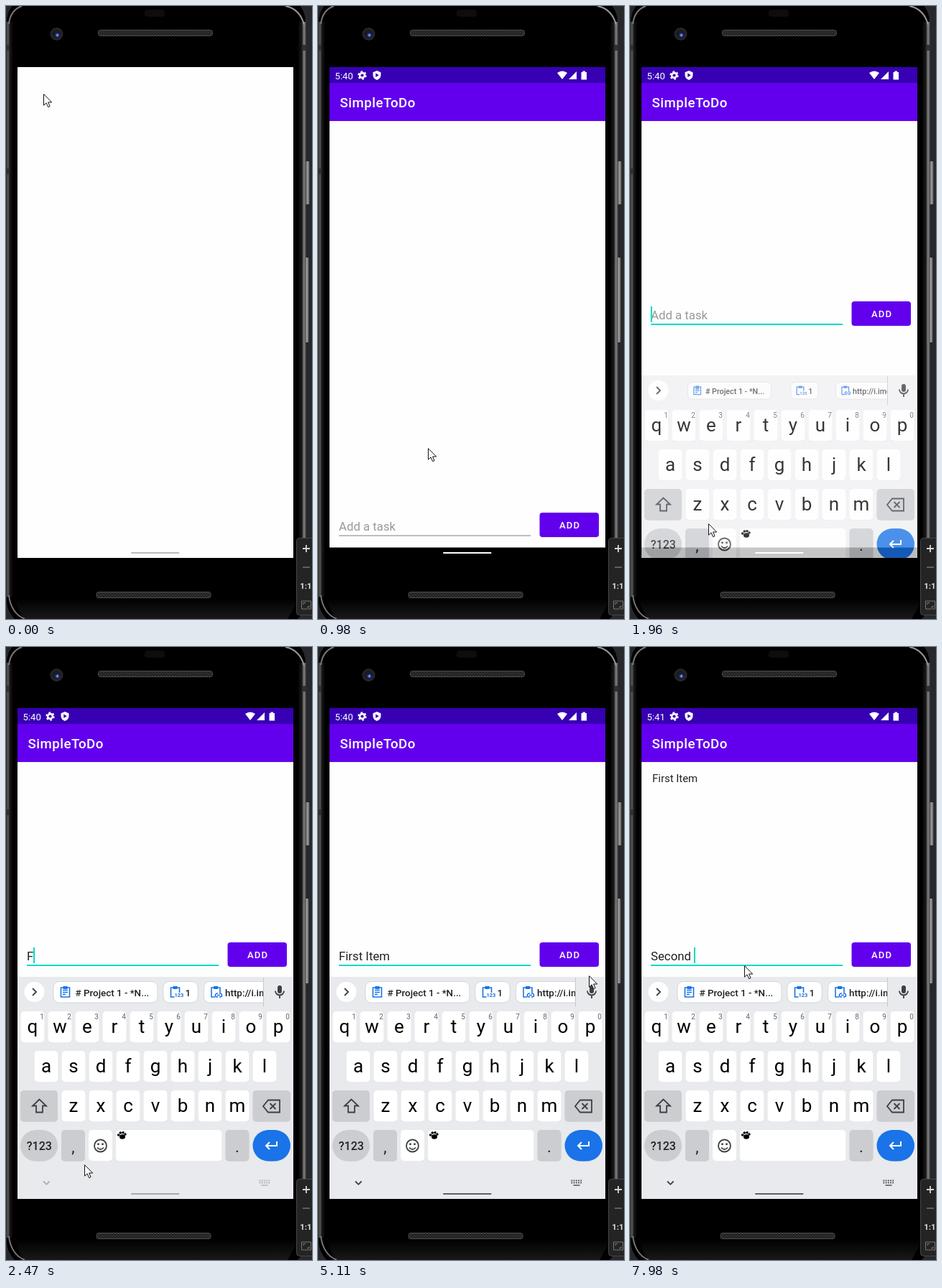
These frames come from a looping animation (426 px wide and 853 px high, 8000 ms). An HTML page:

```html
<!DOCTYPE html>
<html lang="en">
<head>
<meta charset="utf-8">
<title>To-do app</title>
<style>
html, body { margin: 0; width: 100%; height: 100%; overflow: hidden; background: #26282c; }
svg { display: block; width: 100vw; height: 100vh; font-family: Roboto, sans-serif; }
.mid { text-anchor: middle; }
.bold { font-weight: 500; }
.line { fill: none; stroke: #3c4043; stroke-width: 1.8; }
.blue { stroke: #1a73e8; stroke-width: 1.6; }
</style>
</head>
<body>
<svg viewBox="0 0 426 853">
  <defs>
    <linearGradient id="leftEdge"><stop stop-color="#2a2a2a"/><stop offset=".3" stop-color="#5c5c5c"/><stop offset=".5" stop-color="#1c1c1c"/><stop offset="1" stop-color="#000"/></linearGradient>
    <linearGradient id="rightEdge"><stop stop-color="#000"/><stop offset=".5" stop-color="#1a1a1a"/><stop offset=".72" stop-color="#7c7c7c"/><stop offset=".88" stop-color="#666"/><stop offset="1" stop-color="#1c1c1c"/></linearGradient>
    <linearGradient id="side"><stop stop-color="#444"/><stop offset=".5" stop-color="#a2a2a2"/><stop offset="1" stop-color="#555"/></linearGradient>
    <linearGradient id="chin" x2="0" y2="1"><stop stop-color="#000"/><stop offset="1" stop-color="#191919"/></linearGradient>
    <radialGradient id="lens" cx=".58" cy=".62"><stop stop-color="#c3d0ff"/><stop offset=".22" stop-color="#4a5fc0"/><stop offset=".5" stop-color="#171c3c"/><stop offset="1" stop-color="#1c191f"/></radialGradient>
    <pattern id="mesh" width="4" height="4" patternUnits="userSpaceOnUse"><rect width="4" height="4" fill="#1e1e1e"/><path d="M0 0l4 4M4 0L0 4" stroke="#3c3c3c" stroke-width=".7"/></pattern>
    <clipPath id="screen"><path d="M16 85h384v683H16z"/></clipPath>
    <clipPath id="strip"><path d="M60 459h298v42H60z"/></clipPath>
  </defs>

  <!-- phone -->
  <rect width="426" height="853" fill="#26282c"/>
  <rect x="1" y="-14" width="416" height="877" rx="36"/>
  <path d="M0 22h10v800H0z" fill="url(#leftEdge)"/>
  <path d="M406 22h12v800h-12z" fill="url(#rightEdge)"/>
  <path d="M10 824h398l-16 29H24z" fill="url(#chin)"/>
  <g fill="none" stroke="#777" stroke-width="2">
    <path d="M389 0q20 4 26 26" stroke="#999"/><path d="M22 0Q6 6 4 25"/><path d="M4 820q3 25 22 33"/>
  </g>
  <path d="M0 54h4v8H0zM0 226h4v8H0zM413 54h5v8h-5z" fill="#303030"/>
  <rect x="417" y="216" width="5.500" height="60" rx="1.500" fill="url(#side)"/>
  <rect x="416" y="350" width="5.500" height="118" rx="1.500" fill="url(#side)"/>
  <rect x="193" y="5" width="28" height="10" rx="4" fill="#0d0d0d"/>
  <circle cx="70.500" cy="39" r="9" fill="#2a2425"/><circle cx="70.500" cy="39" r="6.500" fill="url(#lens)"/>
  <g fill="url(#mesh)" stroke="#4d4d4d"><rect x="128.500" y="33.500" width="159" height="8" rx="3"/><rect x="126" y="815.500" width="159" height="8" rx="3"/></g>

  <g clip-path="url(#screen)">
    <rect x="16" y="85" width="384" height="683" fill="#fefefe"/>
    <rect id="nav" x="16" y="753.500" width="384" height="15"/>
    <g id="app">
      <rect x="16" y="85" width="384" height="22.500" fill="#3700b3"/>
      <rect x="16" y="160" width="384" height="1" fill="#eee"/>
      <rect x="16" y="107" width="384" height="53" fill="#6200ee"/>
      <text x="30.500" y="141" font-size="18.700" letter-spacing=".470" class="bold" fill="#fff">SimpleToDo</text>
      <text id="item" x="31" y="188" font-size="14.940" fill="#212121">First Item</text>
      <g id="field">
        <text id="entry" x="29" y="435.500" font-size="16.800"></text>
        <rect id="underline" x="29" width="267"/>
        <rect id="caret" y="418" width="2" height="22" fill="#03dac5"/>
        <rect x="309" y="412" width="82" height="33.500" rx="4" opacity=".12"/>
        <rect x="308.500" y="411" width="82.500" height="34" rx="4" fill="#6200ee"/>
        <rect id="ripple" x="308.500" y="411" width="82.500" height="34" rx="4" fill="#fff"/>
        <text x="350.600" y="433" font-size="13.100" letter-spacing="1.170" class="bold mid" fill="#fff">ADD</text>
      </g>
    </g>
    <g id="keyboard">
      <rect id="board" x="16" y="459" width="384" height="490"/>
      <circle cx="39.500" cy="480" r="14" fill="#fff"/>
      <path class="line" d="M37 475l5 5-5 5"/>
      <g id="chips" clip-path="url(#strip)"></g>
      <path d="M358.500 460v40" stroke="#c4c7cb"/>
      <rect x="378" y="471" width="6" height="11" rx="3" fill="#3c4043"/>
      <path class="line" d="M375 478.500a6 6 0 0 0 12 0M381 485v4"/>
      <g id="keys"></g>
      <path class="line" d="M46.500 629.500l-9.500 9h5v9h9v-9h5z"/>
      <path class="line" d="M365 630.500h16v17h-16l-7-8.500zM367.500 635l8 8m0-8l-8 8"/>
      <g fill="#202124"><text x="46.300" y="700" font-size="16" class="mid bold">?123</text><text x="93.500" y="703" font-size="22" class="mid">,</text><text x="322" y="703" font-size="22" class="mid">.</text></g>
      <circle class="line" cx="131.500" cy="694" r="8.500"/>
      <path class="line" d="M127 696.500q4.500 5 9 0"/>
      <path d="M127.200 690.500h2.600v2.600h-2.600zm6 0h2.600v2.600h-2.600z" fill="#3c4043"/>
      <g><ellipse cx="162" cy="681.500" rx="4" ry="3.300"/><circle cx="156.700" cy="679" r="1.800"/><circle cx="159.300" cy="676" r="1.800"/><circle cx="163" cy="675.700" r="1.800"/><circle cx="166" cy="678" r="1.700"/></g>
      <path d="M377 688v6h-15m5-5l-5 5 5 5" fill="none" stroke="#fff" stroke-width="2"/>
      <g id="hints">
        <path class="line" d="M52 743.500l4.300 4.300 4.300-4.300"/>
        <path d="M352.500 742.500h15M352.500 745.500h15" stroke="#555" stroke-width="1.800" stroke-dasharray="1.800 1.400"/><path d="M355.500 749h9" stroke="#555" stroke-width="1.500"/>
      </g>
    </g>
    <g id="status">
      <text id="clock" x="23.600" y="101.500" font-size="13.100"></text>
      <circle cx="61.500" cy="96.500" r="3.400" fill="none" stroke="currentColor" stroke-width="2.600"/>
      <circle cx="61.500" cy="96.500" r="5.200" fill="none" stroke="currentColor" stroke-width="2" stroke-dasharray="2.720"/>
      <path fill-rule="evenodd" d="M82 90l5.500 2.200v4q0 4.500-5.500 6.800-5.500-2.300-5.500-6.800v-4zM80.300 93.500v5.500l4.500-2.800z"/>
      <path d="M333 93q7-5 14 0l-7 9zM349 102h11V91zM366.500 92h2v-1.500h3.500V92h2v10.500h-7.500z"/>
    </g>
    <rect id="pill" x="174" y="760" width="67.500" height="2" rx="1"/>
  </g>

  <!-- emulator zoom panel -->
  <rect x="404.500" y="740.500" width="26" height="107" rx="4" fill="#242424" stroke="#454545"/>
  <path d="M413 755h10M418 750v10" stroke="#d5d5d5" stroke-width="1.800"/>
  <path d="M413 781h10" stroke="#777" stroke-width="1.400"/>
  <text x="417.500" y="811" font-size="11.500" font-weight="700" class="mid" fill="#ddd">1:1</text>
  <path d="M411.500 828h13v11h-13zM414 833v-2.500h3M422 834v2.500h-3" fill="none" stroke="#777"/>

  <path id="mouse" d="M.5.700V16.200l3.600-3.300 2.600 5.800 2.400-1.100-2.500-5.600h5.100z" fill="#fff" stroke="#111"/>
</svg>

<script>
const $ = id => document.getElementById(id);
const set = (id, attrs) => { for (const name in attrs) $(id).setAttribute(name, attrs[name]); };

// Keyboard construction
const key = (x, y, w, fill = '#fff', r = 5) =>
  `<rect x="${x}" y="${y + .6}" width="${w}" height="43.500" rx="${r}" fill="#d9dbde"/>` +
  `<rect x="${x}" y="${y}" width="${w}" height="43.500" rx="${r}" fill="${fill}"/>`;
const GREY = '#cccdd1';
let keys = key(20, 617, 52, GREY) + key(343.5, 617, 52.5, GREY) + key(20, 672, 52, GREY, 22) +
  key(77, 672, 33, GREY) + key(115, 672, 33) + key(153, 672, 147.5) + key(305.5, 672, 33, GREY) +
  key(343.5, 672, 52.5, '#1a73e8', 22);
['qwertyuiop', 'asdfghjkl', 'zxcvbnm'].forEach((row, r) => [...row].forEach((letter, i) => {
  const x = [37, 56, 94][r] + 38 * i, y = [507, 562, 617][r];
  keys += key(x - 16.5, y, 33) + `<text class="mid letter" x="${x}" y="${y + 30}" font-size="26">${letter}</text>`;
  if (!r) keys += `<text class="mid" x="${x + 13}" y="${y + 11}" font-size="10" fill="#5f6368">${(i + 1) % 10}</text>`;
}));
$('keys').innerHTML = keys;
const letters = [...document.querySelectorAll('.letter')];

const marks = [
  '<path class="line blue" d="M-3.500-2.500h7M-3.500.500h7M-3.500 3.500h4"/>',
  '<path d="M-1 1h10v8H-1z" fill="#fff"/><text x="-1" y="7" font-size="7.500" font-weight="700" fill="#1a73e8">123</text>',
  '<path d="M-1 1h10v8H-1z" fill="#fff"/><path class="line blue" d="M3 2H2a2.500 2.500 0 0 0 0 5h1m2-5h1a2.500 2.500 0 0 1 0 5H5M2 4.500h4"/>'
];
const chips = [[66, 145, 96.5, '# Project 1 - *N...'], [219, 48, 249.5, '1'], [275.5, 110, 305, 'http://i.imgur']];
$('chips').innerHTML = chips.map(([x, w, textX, label], i) => `<g class="chip">
  <rect x="${x}" y="465.500" width="${w}" height="29.500" rx="8" fill="#fff" stroke="#d4d7db"/>
  <g transform="translate(${x + 16.5} 480)"><path class="line blue" d="M-6-6H6V7H-6z"/><path d="M-3-8h6v4h-6z" fill="#1a73e8"/>${marks[i]}</g>
  <text x="${textX}" y="486" font-size="13.400" class="bold" fill="#202124">${label}</text></g>`).join('');
const chipNodes = [...document.querySelectorAll('.chip')];

// Timelines: [time, ...values], held until the next entry
const at = (track, t) => track.findLast(entry => entry[0] <= t);
const mouse = [
  [0, 52, 122], [120, 78, 195], [240, 118, 300], [380, 143, 360], [500, 150, 415], [620, 152, 470],
  [740, 154, 525], [860, 155, 575], [980, 153, 615], [1100, 150, 650], [1220, 138, 675], [1340, 124, 700],
  [1460, 113, 716], [1580, 109, 720], [4750, 140, 705], [4870, 225, 620], [4990, 320, 520], [5110, 377, 457],
  [5230, 401, 435], [5350, 390, 430], [5470, 381, 430], [5610, 370, 432], [5730, 310, 438], [5850, 220, 445],
  [5970, 159, 443]
];
const appFade = [[0, 0, 0], [380, .78, .55], [500, .93, .85], [620, 1, 1]];
// offset, opacity, chip scale, background
const slide = [
  [0, 309, 0, 0, '#fff'], [1840, 174, .34, .4, '#f7f7f8'], [1960, 55, .78, .8, '#f0f1f3'],
  [2080, 10, .95, 1, '#e9ebee'], [2200, 0, 1, 1, '#e8eaed']
];
const ripple = [[0, 0], [5610, .14], [5730, .22], [5850, .18], [5970, .12], [6090, .07], [6240, .03], [6360, 0]];
const hints = [[0, .35], [2710, .48], [2850, .58], [2970, .68], [3090, .77], [3330, .9], [3570, 1]];
const pill = [[0, '#bbb'], [380, '#999'], [500, '#fff'], [2080, '#aaa'], [2710, '#909090'], [3330, '#707070'], [3570, '#606060']];
const typed = (word, times) => times.map((time, i) => [time, word.slice(0, i + 1)]);
const entry = [
  [0, ''],
  ...typed('First Item', [2470, 2710, 2850, 3090, 3330, 3720, 3840, 3990, 4110, 4250]),
  [5730, ''],
  ...typed('Second ', [6240, 6750, 7000, 7120, 7490, 7610, 7980])
];

function draw(t) {
  const [, mx, my] = at(mouse, t);
  set('mouse', { transform: `translate(${mx} ${my})` });

  const [, appAlpha, navAlpha] = at(appFade, t);
  set('app', { opacity: appAlpha });
  set('nav', { opacity: navAlpha });
  const ink = t < 500 ? '#000' : '#fff';
  set('status', { fill: ink, color: ink, opacity: t < 120 ? 0 : t < 240 ? .3 : t < 500 ? .6 : 1 });
  $('clock').textContent = t < 6610 ? '5:40' : '5:41';
  set('pill', { fill: at(pill, t)[1] });

  const focused = t >= 1720, text = at(entry, t)[1];
  set('field', { transform: `translate(0 ${t < 1840 ? 294 : 0})` });
  set('underline', { y: focused ? 442 : 442.5, height: focused ? 2 : 1, fill: focused ? '#03dac5' : '#808080' });
  $('entry').textContent = (text || 'Add a task').replaceAll(' ', '\u00a0');
  set('entry', { fill: text ? '#212121' : '#999' });
  const blinkOff = t >= 2320 && t < 2470 || t >= 4750 && t < 5230 || t >= 5730 && t < 6240;
  set('caret', {
    x: 28.8 + (text ? $('entry').getComputedTextLength() : 0),
    opacity: focused && !blinkOff ? 1 : 0
  });
  set('item', { opacity: t >= 5730 ? 1 : 0 });
  set('ripple', { opacity: at(ripple, t)[1] });

  const [, dy, alpha, grow, tint] = at(slide, t);
  set('keyboard', { transform: `translate(0 ${dy})`, opacity: alpha });
  set('board', { fill: tint });
  set('hints', { opacity: at(hints, t)[1] });
  chipNodes.forEach((chip, i) => {
    const cx = chips[i][0] + chips[i][1] / 2, s = i && grow < .5 ? 0 : grow;
    chip.setAttribute('transform', `translate(${cx} 480) scale(${s}) translate(${-cx} -480)`);
    chip.setAttribute('opacity', grow);
  });
  const shifted = t >= 3720 && t < 3840;
  letters.forEach(node => {
    const label = node.textContent;
    node.textContent = shifted ? label.toUpperCase() : label.toLowerCase();
  });
}

function frame() {
  draw(performance.now() % 8000);
  requestAnimationFrame(frame);
}
frame();
</script>
</body>
</html>
```
